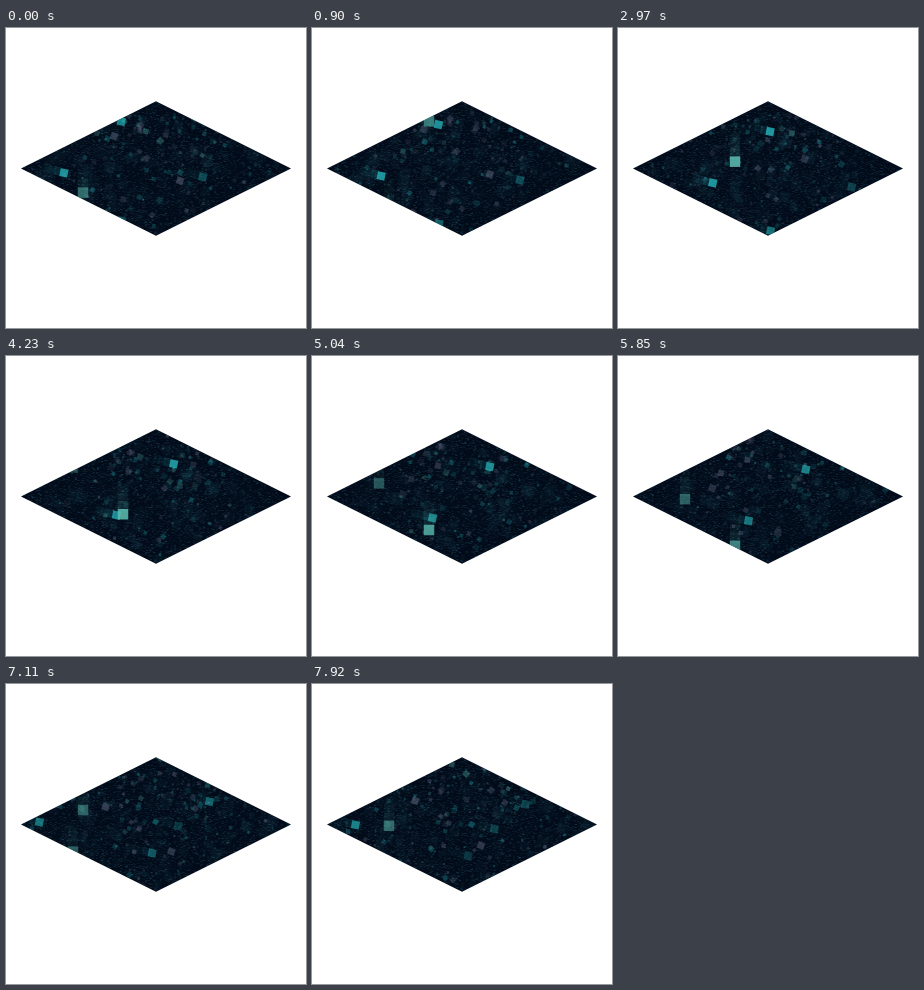
Write an HTML page with a canvas that moves like this. It is 300 px wide and 300 px high and loops after 8 s.

```html
<!DOCTYPE html>
<html lang="en">
<head>
<meta charset="utf-8">
<title>Drifting squares</title>
<style>
  html, body { margin: 0; width: 100%; height: 100%; overflow: hidden; background: #fff; }
  canvas { display: block; width: 100vw; height: 100vh; }
</style>
</head>
<body>
<canvas id="stage" width="300" height="300"></canvas>
<script>
const ctx = document.getElementById('stage').getContext('2d');
const LOOP = 8000, STEP = 90;
const CYCLE = 9.09; // seconds until a particle repeats
const CENTER = { x: 150, y: 140.5 }, HALF = { w: 135, h: 67.2 };

// Three currents: velocity in px/s, tilt in radians
const currents = {
  fall:  { vx: 0,    vy: 19.5, tilt: 0,    size: 10.5, rgb: '92,190,178',  trail: 0.16 },
  drift: { vx: 12.4, vy: 3.4,  tilt: 0.2,  size: 8,    rgb: '38,184,190',  trail: 0.17 },
  rise:  { vx: 4.3,  vy: -7.4, tilt: 0.35, size: 7,    rgb: '122,126,156', trail: 0 }
};

let seed = 41;
function random() {
  seed = (seed * 16807) % 2147483647;
  return seed / 2147483647;
}
const between = (low, high) => low + (high - low) * random();

function pointInDiamond() {
  const u = random(), v = random();
  return [CENTER.x + (u - v) * HALF.w, CENTER.y + (u + v - 1) * HALF.h];
}

// A particle is at (x, y) when brightest, and lives `half` seconds either side
function particle(kind, x, y, peak, half, alpha, extra) {
  return { ...currents[kind], x, y, peak, half, alpha, ...extra };
}

function smallParticle() {
  let [x, y] = pointInDiamond();
  if (random() < 0.35) {
    // gather some near the two upper edges
    x = CENTER.x + (random() < 0.5 ? -35 : 40) + between(-25, 25);
    y = 108 + between(-18, 18);
  }
  const pick = random();
  const kind = pick < 0.15 ? 'fall' : pick < 0.6 ? 'drift' : 'rise';
  return particle(kind, x, y, random() * CYCLE, between(0.8, 2.4), between(0.08, 0.36), {
    tilt: between(0, 0.8), size: 1.8 + 4.2 * random() ** 2, trail: 0
  });
}

function hazeParticle() {
  const [x, y] = pointInDiamond();
  return particle('drift', x, y, random() * CYCLE, 3, between(0.02, 0.07), {
    size: between(6, 12), rgb: '60,150,165', trail: 0
  });
}

const particles = [
  ...Array.from({ length: 180 }, hazeParticle),
  ...Array.from({ length: 520 }, smallParticle),
  particle('rise', 175, 151, 0.25, 4.3, 0.4),
  particle('rise', 103, 117, 7.9, 3.2, 0.4),
  particle('drift', 208, 152, 0.9, 4, 0.35),
  particle('drift', 153, 203, 3, 4, 0.55),
  particle('drift', 150, 103, 2.8, 5.6, 0.8),
  particle('drift', 84, 152, 2.1, 6.1, 0.8),
  particle('fall', 67, 150, 6.2, 2.7, 0.45),
  particle('fall', 77, 157, 8.7, 3.4, 0.52),
  particle('fall', 117, 144, 3.5, 3.6, 0.88)
];

const specks = Array.from({ length: 4500 }, () => ({
  point: pointInDiamond().map(Math.floor),
  color: `rgba(70,140,160,${0.13 * random()})`
}));

function square(x, y, { size, tilt, rgb }, alpha) {
  ctx.save();
  ctx.translate(x, y);
  ctx.rotate(tilt);
  ctx.fillStyle = `rgba(${rgb},${alpha})`;
  ctx.fillRect(-size / 2, -size / 2, size, size);
  ctx.restore();
}

function drawParticle(p, time) {
  const age = time - p.peak;
  if (Math.abs(age) >= p.half) return;
  const alpha = p.alpha * Math.sqrt(Math.cos(Math.PI / 2 * age / p.half));
  const at = (t, a) => square(p.x + p.vx * t, p.y + p.vy * t, p, a);
  if (p.trail) {
    const gap = 0.75 * p.size / Math.hypot(p.vx, p.vy);
    for (let i = 3; i > 0; i--) at(age - i * gap, alpha * p.trail / i);
  }
  at(age, alpha);
}

function draw(time) {
  ctx.clearRect(0, 0, 300, 300);
  ctx.save();
  ctx.beginPath();
  ctx.moveTo(CENTER.x, CENTER.y - HALF.h);
  ctx.lineTo(CENTER.x + HALF.w, CENTER.y);
  ctx.lineTo(CENTER.x, CENTER.y + HALF.h);
  ctx.lineTo(CENTER.x - HALF.w, CENTER.y);
  ctx.closePath();
  ctx.clip();
  ctx.fillStyle = '#020b19';
  ctx.fillRect(0, 0, 300, 300);
  for (const { point: [x, y], color } of specks) {
    ctx.fillStyle = color;
    ctx.fillRect(x, y, 2, 1);
  }
  for (const p of particles) {
    for (const shift of [-CYCLE, 0, CYCLE]) drawParticle(p, time + shift);
  }
  ctx.restore();
}

const start = performance.now();
let lastStep = -1;
function tick() {
  const step = Math.floor(((performance.now() - start) % LOOP) / STEP);
  if (step !== lastStep) {
    lastStep = step;
    draw(step * STEP / 1000);
  }
  requestAnimationFrame(tick);
}
tick();
</script>
</body>
</html>
```
